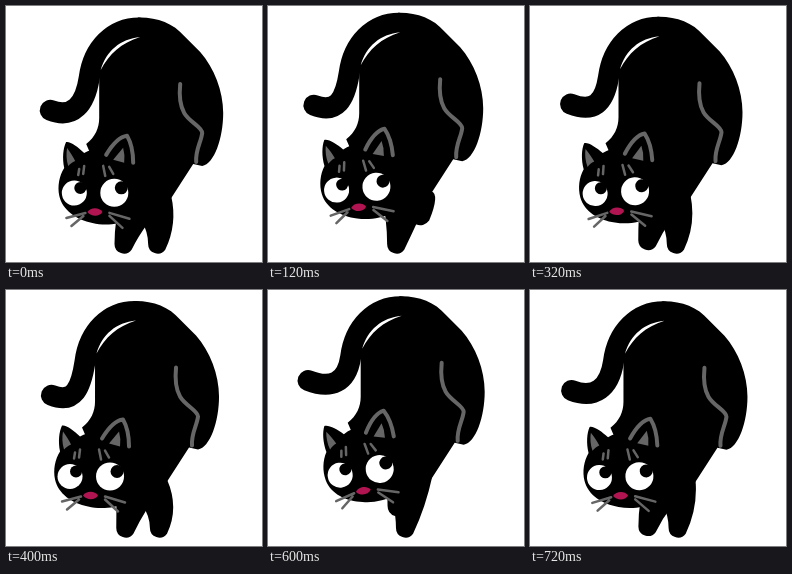
These frames come from a looping animation (256 by 256 pixels, 760 ms). An HTML page:

```html
<!DOCTYPE html>
<html lang="en">
<head>
<meta charset="utf-8">
<title>Prowling cat</title>
<style>
  html, body { margin: 0; width: 100%; height: 100%; overflow: hidden; background: #fff; }
  svg { display: block; width: 100vw; height: 100vh; }
  .line { fill: none; stroke: #666; stroke-linecap: round; stroke-linejoin: round; }
</style>
</head>
<body>
<svg viewBox="0 0 256 256">
  <path id="tail" fill="none" stroke="#000" stroke-width="21" stroke-linecap="round"/>
  <path id="legA"/>
  <path id="legB"/>
  <g id="body">
    <path d="M130 11.500C148 11 165 17 176 30L192 46C206 62 215 85 215 107C215 132 206 158 194 160L185 158L165 189L150 212H110L78 138C87 131 91 122 91 112V64L108 28Z"/>
    <path d="M132 31C112 33 98 45 92.500 64C101 48 113 37 132 31Z" fill="#fff"/>
    <path class="line" stroke-width="4" d="M172 78C171 88 172 100 176 107C181 116 194 121 194 127C193 136 187 144 188 156"/>
  </g>
  <g id="head">
    <path d="M58 136C55 142 54 152 56 162C51 170 49 180 51 190C54 204 68 214 84 217C104 222 130 215 138 200L128 158C128 144 125 130 120 127C112 129 103 137 97 144C90 142 83 143 76 147C70 141 62 135 58 136Z"/>
    <path d="M59 142C62 146 65 151 67 155C64 156 62 158 60 160C58 154 58 147 59 142Z" fill="#666"/>
    <path d="M105 154L115 142Q117 149 116 157Z" fill="#666"/>
    <path class="line" stroke-width="4" d="M98 149C104 139 111 131 119 130C123 137 125 147 125 157"/>
    <path class="line" stroke-width="2.500" d="M76 160L75 168M71 163L70 169M95 160L97 170M101 161L105 168"/>
    <g fill="#fff">
      <circle cx="66" cy="187" r="12.500"/>
      <circle cx="106" cy="187" r="14"/>
    </g>
    <circle cx="72" cy="182" r="6"/>
    <circle cx="113" cy="182" r="6.500"/>
    <path d="M79 206C82 201 91 201 94 206C91 211 83 211 79 206Z" fill="#b01552"/>
    <path class="line" stroke-width="2.500" d="M77 207L58 212M75 210L63 220M101 207L121 213M101 210L114 222"/>
  </g>
</svg>
<script>
const LOOP = 760, PACE = LOOP / 2, STEP = 40;
const el = id => document.getElementById(id);
const wave = (t, period, peak) => Math.cos(2 * Math.PI * (t - peak) / period);
const clamp = v => Math.min(1, Math.max(0, v));
const smooth = v => v * v * (3 - 2 * v);

// A foot slides back on the ground, then swings forward in the air
function foot(t) {
  const u = (t % LOOP) / LOOP, stance = 0.55;
  if (u < stance) return { x: 118 + 37 * u / stance, y: 238, r: 9.5 };
  const v = (u - stance) / (1 - stance);
  const lift = Math.sin(Math.PI * v ** 0.6) ** 2;
  return { x: 156 - 38 * smooth(clamp((v - 0.1) / 0.7)), y: 238 - 32 * lift, r: 9.5 + 2 * lift };
}

function leg({ x, y, r }, hx, hy) {
  return `M${hx - 24} ${hy}Q${x - r} ${y - 24} ${x - r} ${y}` +
         `A${r} ${r} 0 0 0 ${x + r * 0.8} ${y + r * 0.6}Q${x + 20} ${y - 20} ${hx + 26} ${hy}Z`;
}

function draw(t) {
  const sway = 2.5 * wave(t, LOOP, -60);
  const bob = 3 * wave(t, PACE, -15) - 3;
  const tilt = 4.5 * wave(t, PACE, 20) - 4.5;
  const tipX = 43 + 4 * wave(t, PACE, 75), tipY = 98 + 7.5 * wave(t, PACE, 35);
  const at = (x, y) => `${x + sway} ${y + bob}`;
  const move = `translate(${sway} ${bob})`;

  el('body').setAttribute('transform', move);
  el('head').setAttribute('transform', `${move} rotate(${tilt} 90 160)`);
  el('tail').setAttribute('d',
    `M${tipX} ${tipY}C${tipX + 23} ${tipY + 9} ${at(77, 98)} ${at(81, 72)}` +
    `C${at(85, 42)} ${at(105, 22)} ${at(131, 22)}`);
  el('legA').setAttribute('d', leg(foot(t), 137 + sway, 190 + bob));
  el('legB').setAttribute('d', leg(foot(t + PACE), 137 + sway, 190 + bob));
}

function tick(now) {
  draw(Math.floor((now % LOOP) / STEP) * STEP);
  requestAnimationFrame(tick);
}
draw(0);
requestAnimationFrame(tick);
</script>
</body>
</html>
```
